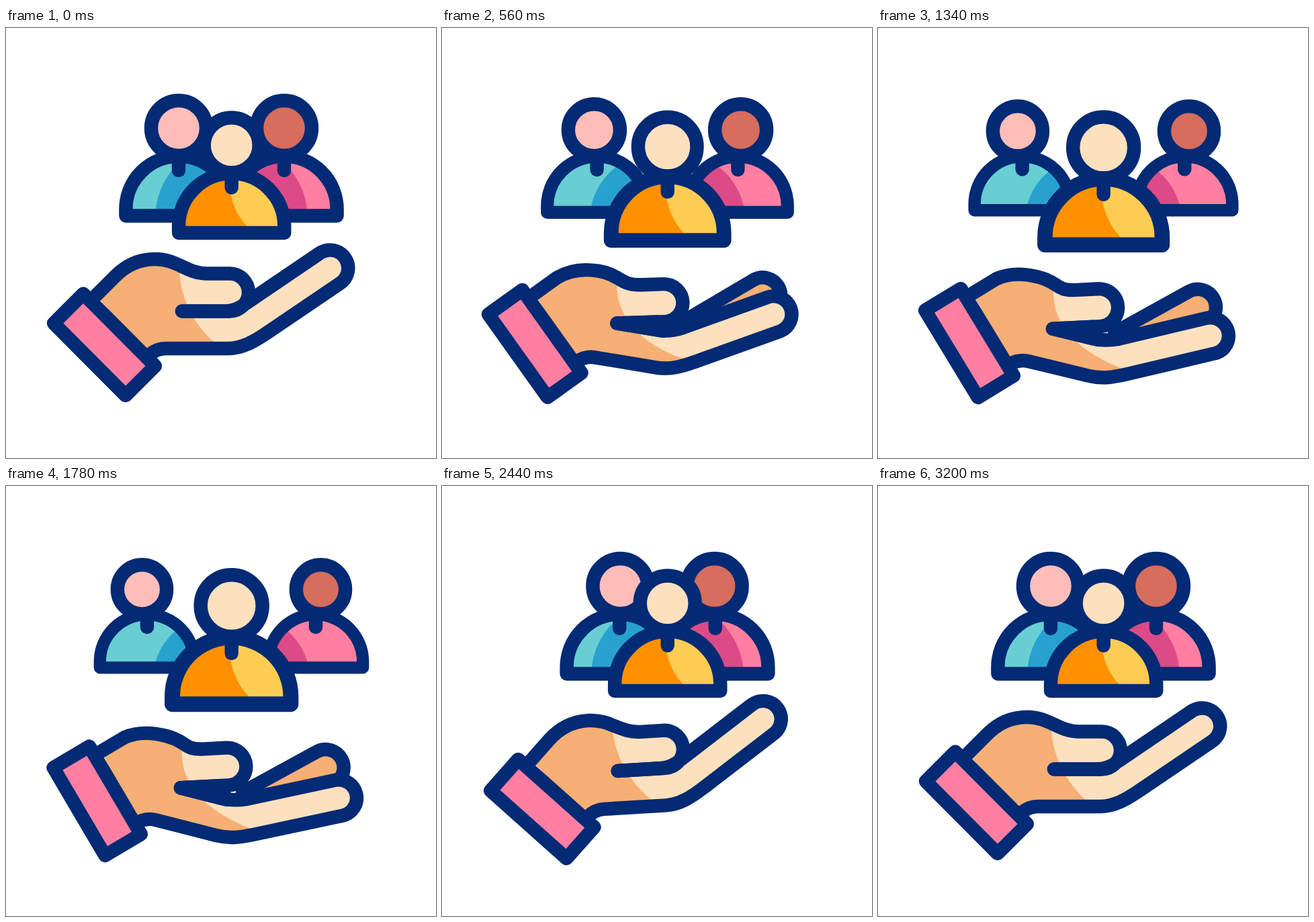
Recreate the animation shown at these times as an HTML page. Size 640x640 px, loop 3.3 s.

```html
<!DOCTYPE html>
<html lang="en">
<head>
<meta charset="utf-8">
<title>Caring hand</title>
<style>
  html, body { margin: 0; width: 100%; height: 100%; overflow: hidden; background: #fff; }
  svg { display: block; width: 100vw; height: 100vh; }
  .ink {
    stroke: #032a74; stroke-width: 20.4;
    stroke-linecap: round; stroke-linejoin: round;
    vector-effect: non-scaling-stroke;
  }
  .line { fill: none; }
  .tan { fill: #f6af74; }
  .light { fill: #fde0be; }
  .pink { fill: #ff7fa2; }
  #web { fill: #032a74; }
</style>
</head>
<body>
<svg viewBox="0 0 640 640">
  <defs>
    <path id="bust" d="M-78.6 10V0A78.6 78.6 0 0 1 78.6 0V10Z"/>
    <clipPath id="bustClip"><use href="#bust"/></clipPath>
    <clipPath id="palmClip"><path class="palm"/></clipPath>
  </defs>
  <g id="people"></g>
  <g id="hand">
    <path id="backFinger" class="ink tan"/>
    <path class="palm tan"/>
    <path id="glow" class="light" clip-path="url(#palmClip)"/>
    <path id="web" class="ink"/>
    <path class="palm ink line"/>
    <path class="ink pink" d="M71 439.5L115 395.5L222 503L178 547Z"/>
  </g>
</svg>
<script>
const LOOP = 3300;
const $ = s => document.querySelector(s);
const set = (el, attrs) => { for (const k in attrs) el.setAttribute(k, attrs[k]); };

// Keys: [time, value, slope per ms]
const peopleKeys = [
  [0, 0, 0], [560, .56, .0012], [900, .79, .00026], [1780, 1, .00022],
  [1835, 1.01, 0], [2500, -.18, 0], [3200, 0, 0], [LOOP, 0, 0]
];
const handKeys = [
  [0, 0, 0], [560, .65, .0013], [900, .87, .0002], [1780, 1, .00012],
  [1870, 1.005, 0], [2500, -.27, 0], [3200, 0, 0], [LOOP, 0, 0]
];

// Cubic Hermite interpolation
function track(keys, time) {
  const i = keys.findIndex(k => k[0] > time);
  const [t0, v0, m0] = keys[i - 1], [t1, v1, m1] = keys[i];
  const d = t1 - t0, u = (time - t0) / d, w = 1 - u;
  return v0 * w * w * (1 + 2 * u) + v1 * u * u * (3 - 2 * u)
    + d * u * w * (m0 * w - m1 * u);
}

// Shading runs ahead of the pose
const lead = v => v * (1.6 - .6 * v);

const person = (id, face, shirt, shade) => `
  <g id="${id}">
    <circle class="head ink" cy="-120.5" r="41" fill="${face}"/>
    <use href="#bust" fill="${shirt}"/>
    <g clip-path="url(#bustClip)">${shade}</g>
    <use href="#bust" class="ink line"/>
    <path class="ink line" d="M0 -78.6V-57.5"/>
  </g>`;
const disc = color => `<circle class="shade" fill="${color}"/>`;

$('#people').innerHTML =
  person('left', '#febdb9', '#68ced2', disc('#27a2cf')) +
  `<g transform="translate(671 0) scale(-1 1)">${
    person('right', '#d66d5d', '#ff7fa2', disc('#dc4b87'))}</g>` +
  person('middle', '#fde0be', '#ff9100',
    '<path fill="#fdcc52" d="M-4 -80V-69C-3 -42 6 -18 23 0L30 20H100V-80Z"/>');

const place = (el, x, y, s) => set(el, { transform: `translate(${x} ${y}) scale(${s})` });
const sides = [$('#left'), $('#right')];
const palms = document.querySelectorAll('.palm');

function drawPeople(p) {
  const out = Math.max(0, p), shift = lead(out);
  const x = 257 - 47 * p, y = 269.5 - 8 * out, s = 1 - .107 * out;
  for (const side of sides) {
    place(side, x, y, s);
    set(side.querySelector('.head'), { cx: -7.5 * p / s });
    set(side.querySelector('.shade'), {
      cx: (336 - 24 * shift - x) / s,
      cy: (283 + 4 * shift - y) / s,
      r: (114 - 21 * shift) / s
    });
  }
  place($('#middle'), 335.7, 295 + 18.5 * out, 1 + .122 * out);
}

// Returns a function that turns points about a pivot
function turn(cx, cy, deg) {
  const a = deg * Math.PI / 180, c = Math.cos(a), s = Math.sin(a);
  return (x, y) => {
    const dx = x - cx, dy = y - cy;
    return `${(cx + dx * c - dy * s).toFixed(2)} ${(cy + dx * s + dy * c).toFixed(2)}`;
  };
}

function drawHand(p) {
  const open = Math.max(0, p), shift = lead(open);
  const thumb = turn(262, 421.5, -17.4 * open);
  const front = turn(338, 449, 7.7 * open);
  const back = turn(338, 449, -8.9 * open);
  const top = 344 + 8 * open;

  const palm = `M134 398L163 369C180 ${352 + 4 * open} 200 ${top} 222 ${top}
    C256 ${top} ${thumb(268, 365.5)} ${thumb(300, 365.5)}
    L${thumb(333, 365.5)}A28 28 0 0 1 ${thumb(333, 421.5)}
    L262 421.5L325 421.5Q342 421.5 ${front(357, 410)}
    L${front(467.8, 334.7)}A27 27 0 0 1 ${front(498.2, 379.3)}
    L${front(386.5, 455)}C${front(370, 466)} 352 477 330 477
    L238 477Q224 477 213 487`;
  palms.forEach(el => set(el, { d: palm }));

  set($('#web'), { d: `M262 421.5L${thumb(322, 421.5)}L332 421.5Z` });
  set($('#backFinger'), {
    d: `M${back(359.4, 407.9)}L${back(464.5, 336.6)}
      A27 27 0 0 1 ${back(494.9, 381.2)}L${back(389.8, 452.5)}`
  });
  set($('#glow'), {
    d: `M${257 - 9 * open} 320L${258 - 9 * open} 362
      C${260 - 4 * open} ${400 + 10 * open}
      ${278 + 22 * shift} ${440 + 7 * shift} ${310 + 75 * shift} ${468 - 13 * shift}
      L620 520V280Z`
  });
  set($('#hand'), {
    transform: `translate(${-5 * open} ${38 * open}) rotate(${14.4 * p} 304 428)`
  });
}

const start = performance.now();
function frame() {
  const time = (performance.now() - start) % LOOP;
  drawPeople(track(peopleKeys, time));
  drawHand(track(handKeys, time));
  requestAnimationFrame(frame);
}
frame();
</script>
</body>
</html>
```
